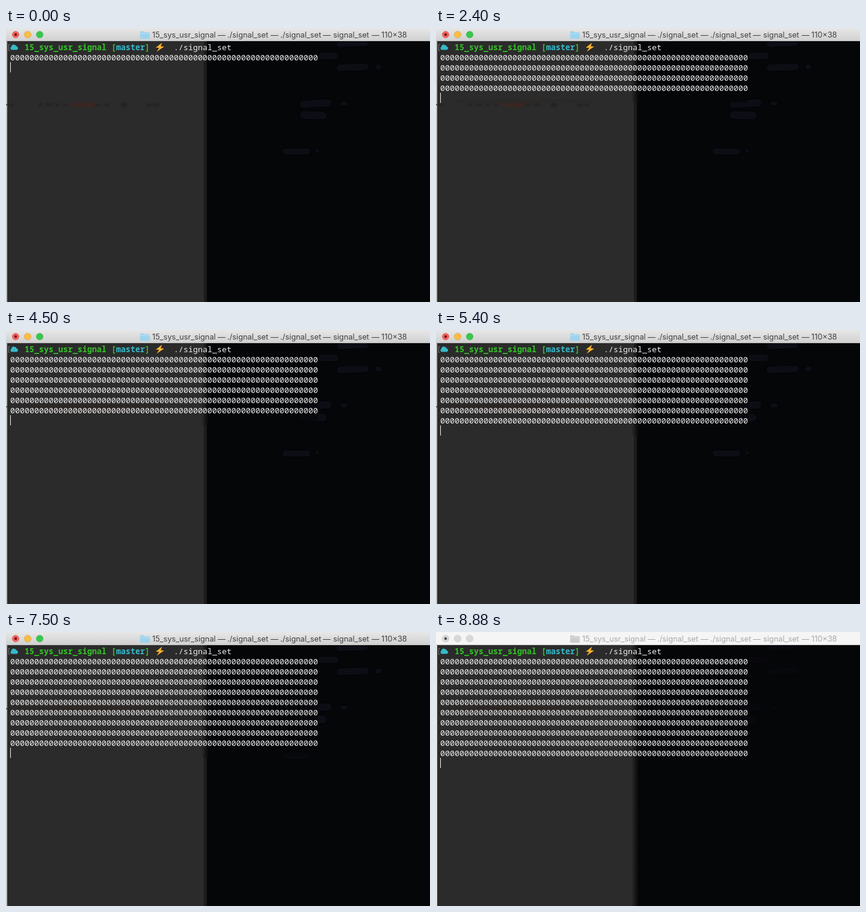
An HTML page for the animation above (8980 ms loop, 705 by 457 pixels).

```html
<!DOCTYPE html>
<html lang="en">
<head>
<meta charset="utf-8">
<title>Terminal</title>
<style>
  html, body { margin: 0; width: 100%; height: 100%; overflow: hidden; background: #050608; }
  svg { display: block; width: 100%; height: 100%; }
  .mono { font: 13.333px "Noto Sans Mono", "DejaVu Sans Mono", monospace; fill: #ededed; white-space: pre; }
  .bold { font-weight: 700; }
  .green { fill: #35c128; }
  .cyan { fill: #35b9c9; }
  .title { font: 12.8px Inter, "Liberation Sans", sans-serif; fill: #414141; }
  .inactive .title { fill: #a8a8a8; }
  .bar { fill: url(#bar); }
  .inactive .bar { fill: #f5f5f5; }
  .folder { fill: #9dd3ee; }
  .inactive .folder { fill: #cdcdcd; }
  .inactive .light { fill: #d8d8d8; stroke: #c4c4c4; }
  .dot { fill: #640d0b; }
  .inactive .dot { fill: #4b4b4b; }
</style>
</head>
<body>
<svg id="stage" viewBox="0 0 705 457" preserveAspectRatio="none">
  <defs>
    <linearGradient id="bar" x2="0" y2="1">
      <stop stop-color="#e7e7e7"/><stop offset="1" stop-color="#d0d0d0"/>
    </linearGradient>
    <linearGradient id="seam" gradientUnits="userSpaceOnUse" x1="325" x2="337" y1="0" y2="0">
      <stop stop-color="#2b2b2b"/><stop offset="1" stop-color="#050608"/>
    </linearGradient>
    <filter id="soft" x="-20%" y="-100%" width="140%" height="300%">
      <feGaussianBlur stdDeviation="3"/>
    </filter>
    <filter id="edge" x="-5%" y="-20%" width="110%" height="140%">
      <feGaussianBlur stdDeviation="0.8"/>
    </filter>
    <clipPath id="redrawn"><rect id="area"/></clipPath>
  </defs>

  <g id="backdrop">
    <rect width="705" height="457" fill="#050608"/>
    <rect width="330" height="457" fill="#2b2b2b"/>
    <rect x="329" width="5" height="457" fill="#1b1b1b"/>
    <g id="shades" fill="#0a0f17" filter="url(#edge)"></g>
    <g id="specks" fill="#232222" filter="url(#edge)"></g>
    <g fill="#3a2721" filter="url(#edge)">
      <ellipse cx="113" cy="128" rx="7" ry="3"/>
      <ellipse cx="126" cy="128" rx="8" ry="4.5"/>
      <ellipse cx="140" cy="128" rx="8" ry="4.5"/>
    </g>
  </g>

  <g clip-path="url(#redrawn)">
    <rect width="705" height="457" fill="url(#seam)"/>
    <use href="#shades" opacity=".4"/>
    <ellipse cx="140" cy="129" rx="118" ry="4" fill="#2d211d" opacity=".7" filter="url(#soft)"/>
  </g>
  <rect id="rim" y="22" width="2" height="435"/>
  <rect id="notch" y="127" width="2" height="2" fill="#555"/>

  <rect class="bar" width="705" height="22"/>
  <rect y="21" width="705" height="1" fill="#b9b9b9"/>
  <g id="lights" stroke-width=".6"></g>
  <circle class="dot" cx="16" cy="11" r="2.2"/>
  <path class="folder" d="M223 7q0-1.500 1.500-1.500h4l1.500 1.500h7.500q1.500 0 1.500 1.500v8q0 1.500-1.500 1.500h-13q-1.500 0-1.500-1.500z"/>
  <path d="M223.500 9h15" stroke="#fff" stroke-opacity=".35"/>
  <text id="title" class="title" y="16"></text>

  <path d="M6.500 27.500h-2v10h2" fill="none" stroke="#777"/>
  <path class="cyan" d="M9.500 36.500a3 3 0 0 1-.5-5.500a3.300 3.300 0 0 1 5.500-2.500a2.500 2.500 0 0 1 3 2.300a2.900 2.900 0 0 1 .3 5.700z"/>
  <text class="mono bold green" x="31" y="37">15_sys_usr_signal [<tspan class="cyan">master</tspan>]</text>
  <path d="M259.500 24.500L249 32.700l5.700.3L250.500 39.500 263 31l-5.800-.5z" fill="#fdb32d"/>
  <text class="mono" x="279" y="37">./signal_set</text>
  <g id="rows"></g>
  <rect id="cursor" x="7" width="1" height="17" fill="#f2f2f2"/>
</svg>
<script>
  const LOOP = 8980, BLUR_AT = 8880, LINE = 17;
  const PRINTS = [450, 1350, 2400, 3450, 4500, 5400, 6450, 7500, 8400];
  const $ = id => document.getElementById(id);

  function add(parent, tag, attrs, text = "") {
    const el = document.createElementNS("http://www.w3.org/2000/svg", tag);
    for (const key in attrs) el.setAttribute(key, attrs[key]);
    el.textContent = text;
    return $(parent).appendChild(el);
  }

  // Faint shapes showing through the window: x, y, width, height, tilt
  [[550, 22, 52, 9, -2], [520, 41, 33, 11, 0], [550, 60, 53, 11, -2],
   [614, 61, 10, 8, 0], [488, 120, 53, 12, -3], [556, 123, 12, 6, 0],
   [489, 139, 44, 13, 2], [460, 201, 46, 10, 0], [515, 202, 5, 6, 0]
  ].forEach(([x, y, width, height, tilt]) => add("shades", "rect", {
    x, y, width, height, rx: height / 2,
    transform: `rotate(${tilt} ${x + width / 2} ${y + height / 2})`
  }));

  [[8, 6, 1], [57, 3, 2], [71, 5, 2.5], [85, 3, 2], [99, 3, 1.5], [153, 4, 1.5],
   [168, 4, 2.5], [196, 5, 4], [239, 5, 2], [251, 4, 2.5]
  ].forEach(([cx, rx, ry]) => add("specks", "ellipse", { cx, cy: 128, rx, ry }));

  ["#fc605b", "#fdbc40", "#34c84a"].forEach((fill, i) => add("lights", "circle", {
    class: "light", cx: 16 + 20 * i, cy: 11, r: 5.8, fill, stroke: "#0003"
  }));

  [[243, "15_sys_usr_signal"], [352, "—"], [368, "./signal_set"], [440, "—"],
   [456, "./signal_set"], [527, "—"], [544, "signal_set"], [608, "—"], [624, "110×38"]
  ].forEach(([x, word]) => add("title", "tspan", { x }, word));

  const rows = Array.from({ length: PRINTS.length + 1 }, (_, i) =>
    add("rows", "text", { class: "mono", x: 7, y: 54 + LINE * i }, "0".repeat(64)));

  function setArea(x, y, width, height) {
    Object.entries({ x, y, width, height }).forEach(([k, v]) => $("area").setAttribute(k, v));
  }

  function draw(t) {
    const printed = PRINTS.filter(at => t >= at).length;
    const inactive = t >= BLUR_AT;
    rows.forEach((row, i) => row.setAttribute("visibility", i <= printed ? "visible" : "hidden"));
    $("cursor").setAttribute("y", 57 + LINE * printed);
    $("stage").classList.toggle("inactive", inactive);
    $("rim").setAttribute("fill", inactive ? "#dedede" : "#bdbdbd");
    $("notch").setAttribute("visibility", inactive ? "hidden" : "visible");
    if (inactive) setArea(0, 0, 705, 457);
    else setArea(7, 57, 512, printed && LINE * (printed + 1));
  }

  const start = performance.now();
  function tick() {
    draw((performance.now() - start) % LOOP);
    requestAnimationFrame(tick);
  }
  tick();
</script>
</body>
</html>
```
